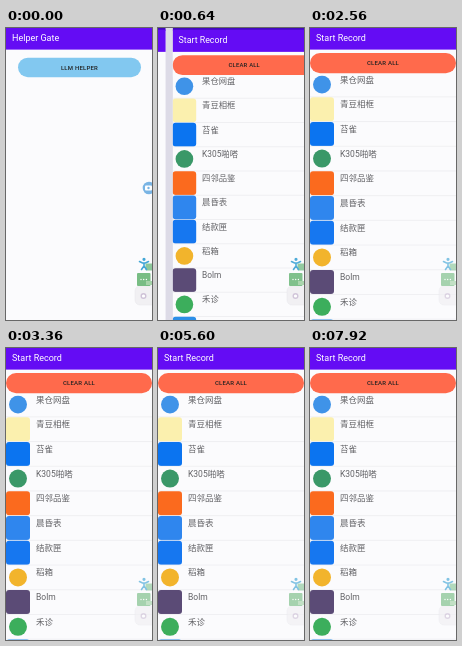
Animation of 146x292 px, one loop 8 s. Source, as an HTML page:

```html
<!DOCTYPE html>
<html lang="zh-CN">
<head>
<meta charset="utf-8">
<style>
html, body { margin: 0; width: 100%; height: 100%; overflow: hidden; background: #dddbe7; }
svg { display: block; width: 100vw; height: 100vh; }
text { font-family: Roboto, "Noto Sans CJK SC", "Noto Sans CJK", sans-serif; }
.title { font-size: 9px; fill: #fff; }
.button { font-size: 6px; font-weight: 500; letter-spacing: .2px; fill: #222; text-anchor: middle; }
.status { font-size: 6px; fill: #eee; }
.row { font-size: 8.5px; fill: #626266; }
</style>
</head>
<body>
<svg viewBox="0 0 146 292" preserveAspectRatio="none">
  <clipPath id="card"><rect y="-13" width="146" height="318" rx="7"/></clipPath>
  <g id="home" clip-path="url(#card)"></g>
  <g id="record" clip-path="url(#card)"></g>
  <g id="camera">
    <circle cx="143" cy="160" r="6.3" fill="#79b4e4"/>
    <rect x="139" y="157.5" width="7" height="5" rx="1" fill="#fff"/>
    <circle cx="142.5" cy="160" r="1.2" fill="#79b4e4"/>
  </g>
  <g id="panel">
    <rect x="129" y="258" width="24" height="19" rx="5" fill="#f1f0f3" stroke="#e4e4e8" stroke-width=".5"/>
    <rect x="139.5" y="235.5" width="8" height="7" rx="1" fill="#8cc79a"/>
    <g stroke="#42a6d6" stroke-width="1.6" stroke-linecap="round" fill="none">
      <path d="M133.5 233.5l3 1.5h3l3-1.5M138 235v3l-2.5 3.5M138 238l2.5 3.5"/>
      <circle cx="138" cy="231.3" r=".8" fill="#42a6d6"/>
    </g>
    <rect x="131" y="245" width="13.5" height="13" rx="1" fill="#78bd84"/>
    <g fill="#fff">
      <circle cx="135" cy="251.5" r=".7"/><circle cx="137.7" cy="251.5" r=".7"/><circle cx="140.4" cy="251.5" r=".7"/>
    </g>
    <rect x="140" y="253" width="6" height="4" fill="#a5d3a8"/>
    <circle cx="137.5" cy="268" r="2.3" fill="#fff" stroke="#cfc3d8" stroke-width="1.4"/>
  </g>
</svg>
<script>
const LOOP = 8000, PITCH = 24.7;
const $ = id => document.getElementById(id);

// name, icon colour, round icon
const apps = [
  ['果仓网盘', '#3f93e8', true],
  ['青豆相框', '#fbf0ae', false],
  ['苔雀', '#0b74f0', false],
  ['K305啪嗒', '#3a9868', true],
  ['四邻品鉴', '#fb6a1e', false],
  ['晨昏表', '#2f86ee', false],
  ['结款匣', '#1677f0', false],
  ['稻箱', '#f2b42c', true],
  ['Bolm', '#5b4b76', false],
  ['禾诊', '#3cae5c', true],
  ['汀渚词屋', '#2c8fe8', false]
];

const icon = (y, color, round) => round
  ? `<circle cx="12" cy="${y}" r="9" fill="${color}"/>`
  : `<rect y="${y - 12}" width="24" height="24" rx="3" fill="${color}"/>`;

const row = ([name, color, round], i) => {
  const y = 56.5 + i * PITCH;
  return `${icon(y, color, round)}
    <text class="row" x="30" y="${y - 2}">${name}</text>
    <path d="M0 ${y + PITCH / 2}H146" stroke="#e3e3e6" stroke-width=".5"/>`;
};

const screen = (title, body) => `
  <rect y="-13" width="146" height="318" fill="#fbfbfd"/>${body}
  <rect y="-13" width="146" height="13" fill="#3f08bd"/>
  <rect y="-1" width="146" height="22.6" fill="#640cf4"/>
  <text class="status" x="25" y="-4">02:40</text>
  <path d="M104 -6h9m3 0h7m3 0h9" stroke="#ddd" stroke-width="2"/>
  <path d="M52 301.5h42" stroke="#777" stroke-width="1.2" stroke-linecap="round"/>
  <text class="title" x="6" y="13">${title}</text>`;

const button = (x, y, w, h, color, label) => `
  <rect x="${x}" y="${y}" width="${w}" height="${h}" rx="${h / 2}" fill="${color}"/>
  <text class="button" x="${x + w / 2}" y="${y + h / 2 + 2.2}">${label}</text>`;

$('home').innerHTML = screen('Helper Gate', button(12, 29.7, 123, 19.5, '#82c8f0', 'LLM HELPER'));
$('record').innerHTML = screen('Start Record',
  apps.map(row).join('') +
  '<rect y="21" width="146" height="26.5" fill="#fbfbfd"/>' +
  button(0, 25, 146, 20.2, '#ff6a4c', 'CLEAR ALL'));

const ease = (t, from, to) => {
  const u = Math.min(1, Math.max(0, (t - from) / (to - from)));
  return u * u * (3 - 2 * u);
};

function place(id, offset, scale) {
  $(id).setAttribute('transform',
    `translate(${73 + offset * 153 * scale} 146) scale(${scale}) translate(-73 -146)`);
}

function draw(now) {
  const t = now % LOOP;
  // The cards shrink, slide across, and grow back as the slide settles.
  const scale = 1 - 0.08 * (ease(t, 40, 300) - ease(t, 420, 740));
  const slide = ease(t, 200, 740);
  place('home', -slide, scale);
  place('record', 1 - slide, scale);
  $('camera').setAttribute('opacity', 1 - ease(t, 80, 320));
  $('panel').setAttribute('opacity', 1 - 0.35 * ease(t, 500, 1000));
  requestAnimationFrame(draw);
}
requestAnimationFrame(draw);
</script>
</body>
</html>
```
